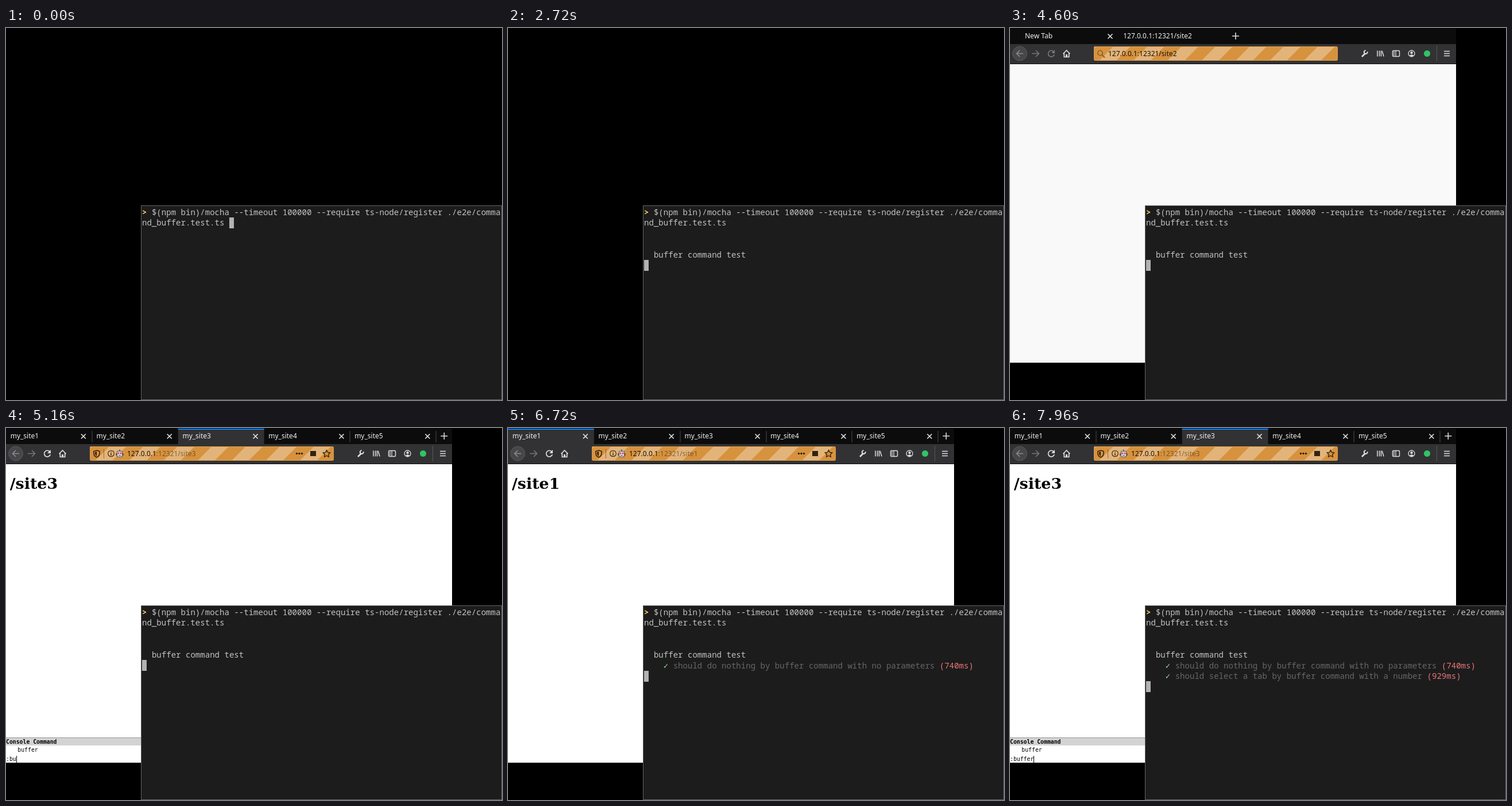
Recreate the animation shown at these times as an HTML page with a canvas. Size 864 px wide and 648 px high, loop 8 s.

```html
<!DOCTYPE html>
<html lang="en">
<head>
<meta charset="utf-8">
<title>Browser test run</title>
<style>
  html, body { margin: 0; width: 100%; height: 100%; overflow: hidden; background: #000; }
  canvas { display: block; }
</style>
</head>
<body>
<canvas id="stage" width="864" height="648"></canvas>
<script>
const ctx = document.getElementById('stage').getContext('2d');
const LOOP = 8000;
const HOST = '127.0.0.1';
const UI = '12px "Noto Sans", "Open Sans", sans-serif';
const MONO = '14.07px "Noto Sans Mono", "DejaVu Sans Mono", monospace';
const CONSOLE = '9.8px "DejaVu Sans Mono", monospace';
const HEADING = 'bold 26.9px "DejaVu Serif", "Noto Serif", serif';
const BRIGHT = '#dedee0', FADED = '#77777a', INK = '#33240f', PANEL = '#323234', DARK = '#0c0c0d';

function rect(x, y, w, h, color) {
  ctx.fillStyle = color;
  ctx.fillRect(x, y, w, h);
}

function text(str, x, y, font, color) {
  ctx.font = font;
  ctx.fillStyle = color;
  ctx.fillText(str, x, y);
}

function path(d, color, width, x = 0, y = 0) {
  ctx.save();
  ctx.translate(x, y);
  const shape = new Path2D(d);
  if (width) {
    ctx.strokeStyle = color;
    ctx.lineWidth = width;
    ctx.stroke(shape);
  } else {
    ctx.fillStyle = color;
    ctx.fill(shape);
  }
  ctx.restore();
}

function circle(x, y, r, color, lineWidth) {
  ctx.beginPath();
  ctx.arc(x, y, r, 0, Math.PI * 2);
  if (lineWidth) {
    ctx.strokeStyle = color;
    ctx.lineWidth = lineWidth;
    ctx.stroke();
  } else {
    ctx.fillStyle = color;
    ctx.fill();
  }
}

// Each test run reopens the tabs, then types a command.
const RUNS = [
  { start: 4520, command: 'buffer', closeAt: 920 },
  { start: 5760, command: 'buffer 1', closeAt: 960, selectAt: 920 },
  { start: 7080, command: 'buffer', closeAt: Infinity, lastKeyAt: 880 }
];

function browserState(t) {
  if (t < 4600) return { labels: ['New Tab'], active: 0, blank: true };
  const run = RUNS.findLast(r => t >= r.start);
  const c = t - run.start;
  const count = 1 + [80, 120, 200, 240].filter(at => c >= at).length;
  const loading = c >= 80 && c < 280;
  const labels = Array.from({ length: count }, (_, i) => {
    if (i === 0 && run === RUNS[0] && c < 120) return 'New Tab';
    return i > 0 && loading ? `${HOST}:12321/site${i + 1}` : `my_site${i + 1}`;
  });
  let active = c < 360 ? count - 1 : 2;
  if (c >= run.selectAt) active = 0;

  let typed = null;
  if (c >= 520 && c < run.closeAt) {
    let n = Math.max(0, Math.floor((c - 560) / 40));
    if (c < run.lastKeyAt) n = Math.min(n, run.command.length - 1);
    typed = run.command.slice(0, n);
  }
  return { labels, active, loading, typed };
}

function drawTabs({ labels, active, loading }) {
  const width = Math.min(189.5, 749.3 / labels.length);
  rect(0, 1, 777, 27, DARK);
  labels.forEach((label, i) => {
    const x = i * width, right = x + width;
    if (i === active && !loading) {
      rect(x, 1, width, 27, PANEL);
      rect(x, 1, width, 2, '#0a84ff');
    }
    text(label, x + (label === 'New Tab' ? 26 : 7.7), 18, UI, '#f0f0f1');
    if (!(loading && i === active)) path('M-4-4L4 4M4-4L-4 4', '#f0f0f1', 1.5, right - 15, 14.5);
    if (i !== active && i + 1 !== active) rect(Math.round(right) - 0.5, 5, 1, 20, '#4a4a4c');
  });
  path('M-6 0H6M0-6V6', BRIGHT, 1.6, labels.length * width + 14, 14);
}

function drawStripes(left, right) {
  const band = 21 * Math.SQRT2, height = 25;
  rect(left, 32, right - left, height, '#d7923e');
  ctx.fillStyle = '#e3b47a';
  for (let x = right - 2 * band; x > left - 2 * band; x -= 2 * band) {
    ctx.beginPath();
    ctx.moveTo(x, 57);
    ctx.lineTo(x + band, 57);
    ctx.lineTo(x + band + height, 32);
    ctx.lineTo(x + height, 32);
    ctx.fill();
  }
}

function drawAddress(state, t) {
  const wide = t < 4400, left = wide ? 150 : 146, right = wide ? 594 : 571;
  const controlled = t < 3640 ? 0 : t < 3680 ? 0.33 : t < 3760 ? 0.67 : 1;
  ctx.save();
  ctx.beginPath();
  ctx.roundRect(left, 32, right - left, 25, 3);
  ctx.clip();
  rect(left, 32, right - left, 25, '#474749');
  ctx.globalAlpha = controlled;
  drawStripes(left, right);
  ctx.restore();
  ctx.beginPath();
  ctx.roundRect(left + 0.5, 32.5, right - left - 1, 24, 3);
  ctx.strokeStyle = controlled ? '#dd9c4c' : '#525254';
  ctx.lineWidth = 1;
  ctx.stroke();

  if (state.blank || state.loading) {
    const color = controlled ? '#8a5f29' : '#a5a5a7';
    circle(left + 11, 43.5, 4.2, color, 1.6);
    path('M14 46.5L19 51.5', color, 2, left);
  }
  if (state.blank) {
    text('Search or enter address', left + 25, 49, UI, controlled ? 'rgba(30,20,5,.5)' : '#a5a5a7');
    return;
  }
  const x = state.loading ? 171 : 211;
  const rest = `:12321/site${state.active + 1}`;
  text(HOST, x, 49, UI, '#17110a');
  const hostWidth = ctx.measureText(HOST).width;
  text(rest, x + hostWidth, 49, UI, state.labels.length === 2 ? '#17110a' : 'rgba(40,28,10,.52)');
  if (state.loading) return;

  path('M158 39L163 40.5V44Q163 49 158 51Q153 49 153 44V40.5Z', INK, 1.6);
  path('M158 41V49Q155 47 155 44V42Z', INK);
  rect(170, 37, 1, 16, 'rgba(60,40,10,.5)');
  circle(183, 44.5, 5.3, INK, 1.1);
  path('M183 43.5V48M183 41V42.3', INK, 1.4);
  path('M198 37.5V40M192 44V48M204 44V48', '#544a50', 1.5);
  ctx.beginPath();
  ctx.roundRect(193, 40, 10, 10, 2);
  ctx.fillStyle = '#dedde4';
  ctx.fill();
  path('M193.5 40.5H202.5V50H193.5Z', '#565063', 1);
  circle(196, 44, 1.4, '#c33');
  circle(200, 44, 1.4, '#c33');
  rect(196, 47, 4, 1, '#565063');
  for (const dot of [506.5, 511, 515.5]) circle(dot, 44.5, 1.7, INK);
  rect(530, 40, 10, 9, INK);
  path('M558.5 38.5L560.4 42.4L564.7 43L561.6 46L562.3 50.3L558.5 48.2L554.7 50.3L555.4 46L552.3 43L556.6 42.4Z', INK, 1.4);
}

function drawToolbar(state, t) {
  rect(0, 28, 777, 34, PANEL);
  rect(0, 62, 777, 1, DARK);
  circle(17, 44.5, 12.5, '#474749');
  circle(17, 44.5, 12.5, '#5b5b5d', 1);
  path('M23 44.5H12M17 39L11.5 44.5L17 50', '#8b8b8d', 1.6);
  path('M38 44.5H49M45 39L50.5 44.5L45 50', FADED, 1.6);
  const reload = state.blank || state.loading ? FADED : BRIGHT;
  path('M76.2 41.3A5.4 5.4 0 1 0 77.2 46', reload, 1.7);
  path('M78 38V44H72Z', reload);
  path('M92.5 45L98.5 39L104.5 45M94.3 44V50.5H102.7V44', BRIGHT, 1.7);
  rect(97, 46, 3, 4.5, BRIGHT);
  drawAddress(state, t);

  const shift = t < 4400 ? 27 : 0;
  path('M-5 5L1-1', BRIGHT, 2.6, 618 + shift, 45);
  path('M4.6-3.8A3 3 0 1 1 1.6-6', BRIGHT, 2, 618 + shift, 45);
  path('M-5-5V5M-1.5-5V5M1.5-5V5M3.2-4.5L6 5', BRIGHT, 1.5, 645 + shift, 44.5);
  ctx.beginPath();
  ctx.roundRect(666.5 + shift, 39.5, 12, 10, 1.5);
  ctx.strokeStyle = BRIGHT;
  ctx.lineWidth = 1.5;
  ctx.stroke();
  path('M0-5V5M-4-2.5H-2M-4 0H-2M-4 2.5H-2', BRIGHT, 1.3, 672 + shift, 44.5);
  circle(699.5 + shift, 44.5, 5.5, BRIGHT, 1.3);
  circle(699.5 + shift, 43, 2.2, BRIGHT);
  path('M-3.6 3.6Q0 0 3.6 3.6Q0 6.5-3.6 3.6Z', BRIGHT, 0, 699.5 + shift, 44.5);
  if (!shift) circle(726.5, 44.5, 5.5, '#2fc565');
  rect(743, 31, 1, 27, '#59595b');
  path('M756 40.5H766M756 44.5H766M756 48.5H766', BRIGHT, 1.5);
}

function drawConsole(typed) {
  if (typed) {
    rect(0, 539, 777, 44, '#fff');
    rect(0, 539, 777, 1, '#999');
    rect(0, 540, 777, 13, '#d3d3d3');
    text('Console Command', 0, 550, 'bold ' + CONSOLE, '#000');
    text('buffer', 20.3, 564, CONSOLE, '#000');
  } else {
    rect(0, 569, 777, 1, '#999');
  }
  const line = ':' + typed;
  text(line, 0, 580, CONSOLE, '#000');
  rect(Math.round(ctx.measureText(line).width), 571, 1, 12, '#000');
}

function drawBrowser(t) {
  const state = browserState(t);
  const empty = state.blank || state.loading;
  rect(0, 63, 777, 520, empty ? '#f9f9fa' : '#fff');
  drawTabs(state);
  drawToolbar(state, t);
  if (!empty) text(`/site${state.active + 1}`, 6.7, 105.5, HEADING, '#000');
  if (state.typed != null) drawConsole(state.typed);
}

const CELL = 8.44, ROW = 18.56;

function put(str, col, row, color, style = '') {
  text(str, 237 + col * CELL, 325.8 + row * ROW, style + MONO, color);
}

function putResult(title, time, row) {
  put('✓', 4, row, '#87e787');
  put(title, 6, row, '#666');
  put(`(${time}ms)`, 7 + title.length, row, '#e8747a');
}

function drawTerminal(t) {
  const fg = '#c2c2c2';
  rect(235, 309, 629, 339, '#666');
  rect(236, 310, 627, 337, '#1c1c1c');
  put('>', 0, 0, '#ffcf5f', 'bold ');
  put('$(npm bin)/mocha --timeout 100000 --require ts-node/register ./e2e/comma', 2, 0, fg);
  put('nd_buffer.test.ts', 0, 1, fg);
  let col = 18, row = 1;
  if (t >= 1440) { col = 0; row = 2; }
  if (t >= 2720) { put('buffer command test', 2, 4, fg); row = 5; }
  if (t >= 5400) { putResult('should do nothing by buffer command with no parameters', 740, 5); row = 6; }
  if (t >= 6760) { putResult('should select a tab by buffer command with a number', 929, 6); row = 7; }
  rect(Math.round(237 + col * CELL), Math.round(311.5 + row * ROW), 8, 19, '#b2b2b2');
}

function frame() {
  const t = performance.now() % LOOP;
  rect(0, 0, 864, 648, '#000');
  if (t >= 3360) drawBrowser(t);
  drawTerminal(t);
  requestAnimationFrame(frame);
}
frame();
</script>
</body>
</html>
```
